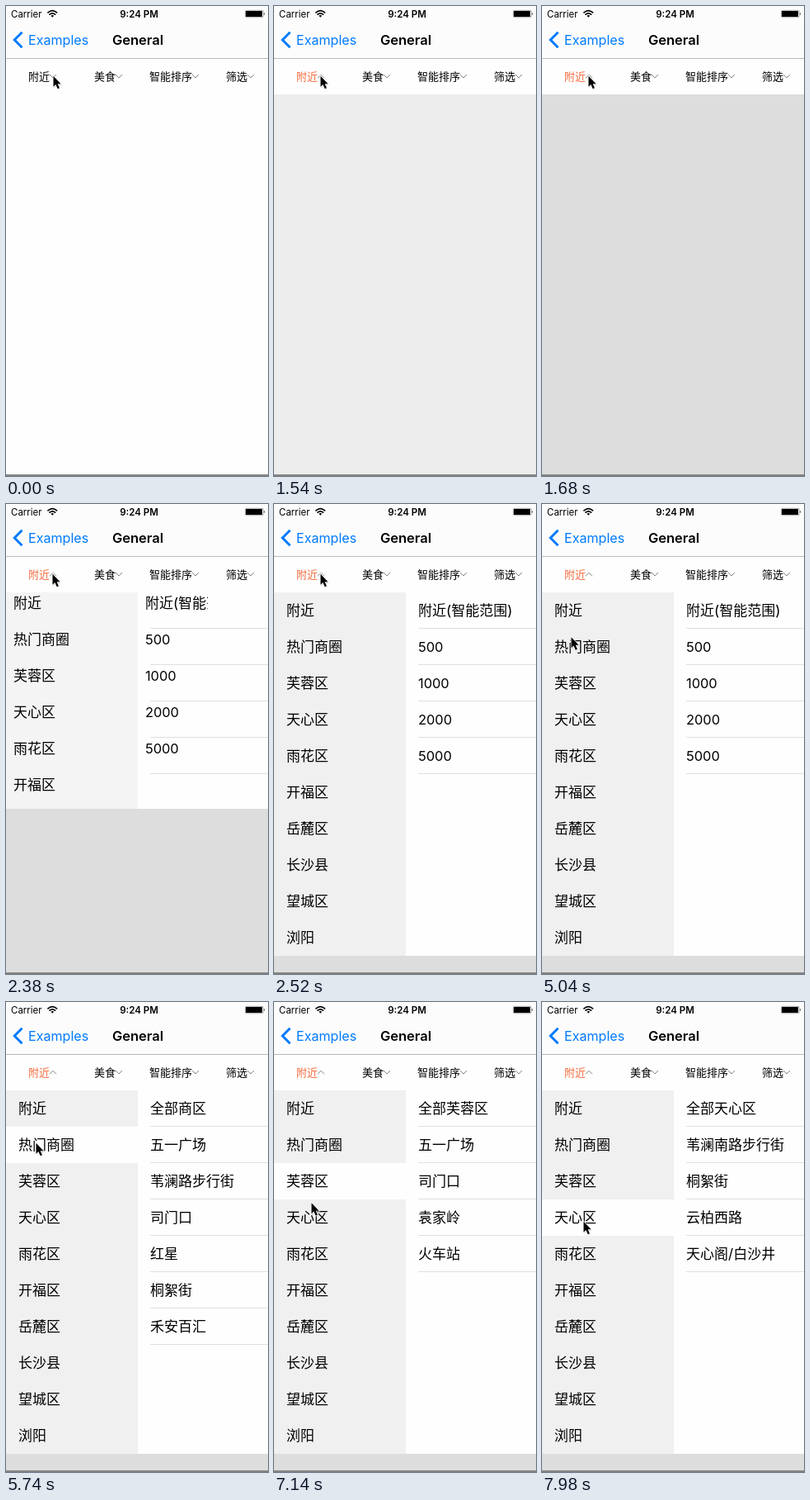
An HTML page for the animation above (8 s loop, 318 by 569 pixels).

```html
<!DOCTYPE html>
<html lang="zh-CN">
<head>
<meta charset="utf-8">
<title>General</title>
<style>
  html, body { margin: 0; width: 100%; height: 100%; overflow: hidden; background: #fefefe; }
  svg { font-family: Inter, "Noto Sans CJK SC", "Noto Sans CJK", sans-serif; }
  #stage { display: block; }
  .line { fill: none; stroke-linecap: round; stroke-linejoin: round; }
</style>
</head>
<body>
<svg id="stage" width="318" height="569" viewBox="0 0 318 569">
  <rect width="318" height="569" fill="#fefefe"/>
  <rect width="318" height="63" fill="#fcfcfc"/>
  <rect y="63" width="318" height="1" fill="#b9b9b9"/>

  <text x="6" y="13.6" font-size="11.5">Carrier</text>
  <path class="line" d="M51 7.9Q56.3 3.2 61.6 7.9M53 10.2Q56.3 7.4 59.6 10.2" stroke="#000" stroke-width="1.7"/>
  <path d="M54.4 11.7Q56.3 10.2 58.2 11.7L56.3 13.7Z"/>
  <text x="161.5" y="13.6" font-size="11.5" font-weight="600" text-anchor="middle">9:24 PM</text>
  <rect x="290.3" y="5.3" width="22" height="8.4" rx="1.4" fill="none" stroke="#777" stroke-width=".6"/>
  <rect x="291" y="6" width="20" height="7" rx=".6"/>
  <path d="M313.2 7.8Q314.8 9.5 313.2 11.2Z"/>

  <path d="M19.5 31.7L10.3 41L19.5 50.3" fill="none" stroke="#007aff" stroke-width="3"/>
  <text x="27" y="47" font-size="16.1" fill="#007aff">Examples</text>
  <text x="160" y="47" font-size="16.5" font-weight="600" text-anchor="middle">General</text>

  <g id="tabs"></g>
  <rect id="dim" y="107" width="318" height="460" fill="#ddd"/>
  <svg id="menu" y="107" width="318" height="0"></svg>
  <rect y="567" width="318" height="2" fill="#858585"/>

  <g id="cursor">
    <path d="M1 3V16L4 13.5L6.5 18L8.5 17L7 12.5H11Z" opacity=".15"/>
    <path d="M.5 1.2V14.2L3.4 11.6L5.7 16.8L7.9 15.8L5.7 10.8H9.6Z" stroke="#fff" stroke-width="1.3" paint-order="stroke"/>
  </g>
</svg>
<script>
const LOOP = 8000, STEP = 140, ROW = 44;
const $ = id => document.getElementById(id);

const tabs = [['附近', 27], ['美食', 107], ['智能排序', 174], ['筛选', 267]];
const areas = ['附近', '热门商圈', '芙蓉区', '天心区', '雨花区', '开福区', '岳麓区', '长沙县', '望城区', '浏阳'];
const places = [
  ['附近(智能范围)', '500', '1000', '2000', '5000'],
  ['全部商区', '五一广场', '苇澜路步行街', '司门口', '红星', '桐絮街', '禾安百汇'],
  ['全部芙蓉区', '五一广场', '司门口', '袁家岭', '火车站'],
  ['全部天心区', '苇澜南路步行街', '桐絮街', '云柏西路', '天心阁/白沙井']
];
const MENU_HEIGHT = areas.length * ROW;

// Times at which the next area is tapped
const taps = [5600, 6300, 7840];

// Cursor moves: start, duration, destination
const home = { x: 57, y: 83.5 };
const moves = [
  { at: 560, ms: 280, x: 61, y: 95 },
  { at: 840, ms: 280, x: 56, y: 83.5 },
  { at: 3220, ms: 140, x: 65, y: 92 },
  { at: 3360, ms: 280, x: 41, y: 160 },
  { at: 3640, ms: 420, x: 35, y: 132 },
  { at: 4760, ms: 420, x: 35, y: 174 },
  { at: 5180, ms: 140, x: 36, y: 169.5 },
  { at: 5740, ms: 700, x: 43, y: 220 },
  { at: 7000, ms: 280, x: 47, y: 264 },
  { at: 7280, ms: 560, x: 50, y: 264.5 }
];

const ramp = (t, from, ms) => Math.min(1, Math.max(0, (t - from) / ms));
const ease = u => u * u * (3 - 2 * u);

function cursorAt(t) {
  return moves.reduce((p, m) => {
    const u = ramp(t, m.at, m.ms);
    return { x: p.x + (m.x - p.x) * u, y: p.y + (m.y - p.y) * u };
  }, home);
}

function drawTabs(active) {
  $('tabs').innerHTML = tabs.map(([label, x], i) => {
    const on = active && i === 0;
    const chevron = on ? 'M-3.7 2L0 -1.7L3.7 2' : 'M-3.7 -1.7L0 2L3.7 -1.7';
    return `<text x="${x}" y="90" font-size="13" fill="${on ? '#f56b3f' : '#000'}">${label}</text>
      <path class="line" d="${chevron}" transform="translate(${x + label.length * 13 + 4} 85)" stroke="#858585"/>`;
  }).join('');
}

// Labels grow from the top left corner of their row while the menu opens
function cell(text, x, i, width, open) {
  const size = /^\d+$/.test(text) ? 16.4 : 17;
  return `<svg x="${x + 15 * open}" y="${i * ROW}" width="${width * open}" height="${ROW * open}">
    <text y="${ROW / 2 * open + 6.3}" font-size="${size}">${text}</text></svg>`;
}

function drawMenu(open, area) {
  const mark = area ? `<rect y="${area * ROW}" width="160" height="${ROW}" fill="#fefefe"/>` : '';
  $('menu').setAttribute('height', Math.round(MENU_HEIGHT * open));
  $('menu').style.display = open ? '' : 'none';
  $('menu').innerHTML = `<rect width="318" height="${MENU_HEIGHT}" fill="#fefefe"/>
    <rect width="160" height="${MENU_HEIGHT}" fill="${open < 1 ? '#f4f4f4' : '#f0f0f0'}"/>${mark}` +
    areas.map((name, i) => cell(name, 0, i, 130, open)).join('') +
    places[area].map((name, i) => cell(name, 160, i, 128, open) +
      `<rect x="175" y="${i * ROW + 43}" width="143" height="1" fill="#dfdfdf"/>`).join('');
}

let shown = '';
function render(time) {
  const t = Math.floor(time / STEP) * STEP;
  const dim = ramp(t, 1400, 280);
  const open = ease(ramp(t, 2211, 300));
  const area = taps.filter(tap => tap <= t).length;
  const { x, y } = cursorAt(t);
  const key = [dim, open, area].join();
  if (key !== shown) {
    shown = key;
    $('dim').setAttribute('opacity', dim);
    drawTabs(dim > 0);
    drawMenu(open, area);
  }
  $('cursor').setAttribute('transform', `translate(${x} ${y})`);
}

const start = performance.now();
function tick() {
  render((performance.now() - start) % LOOP);
  requestAnimationFrame(tick);
}
tick();
</script>
</body>
</html>
```
